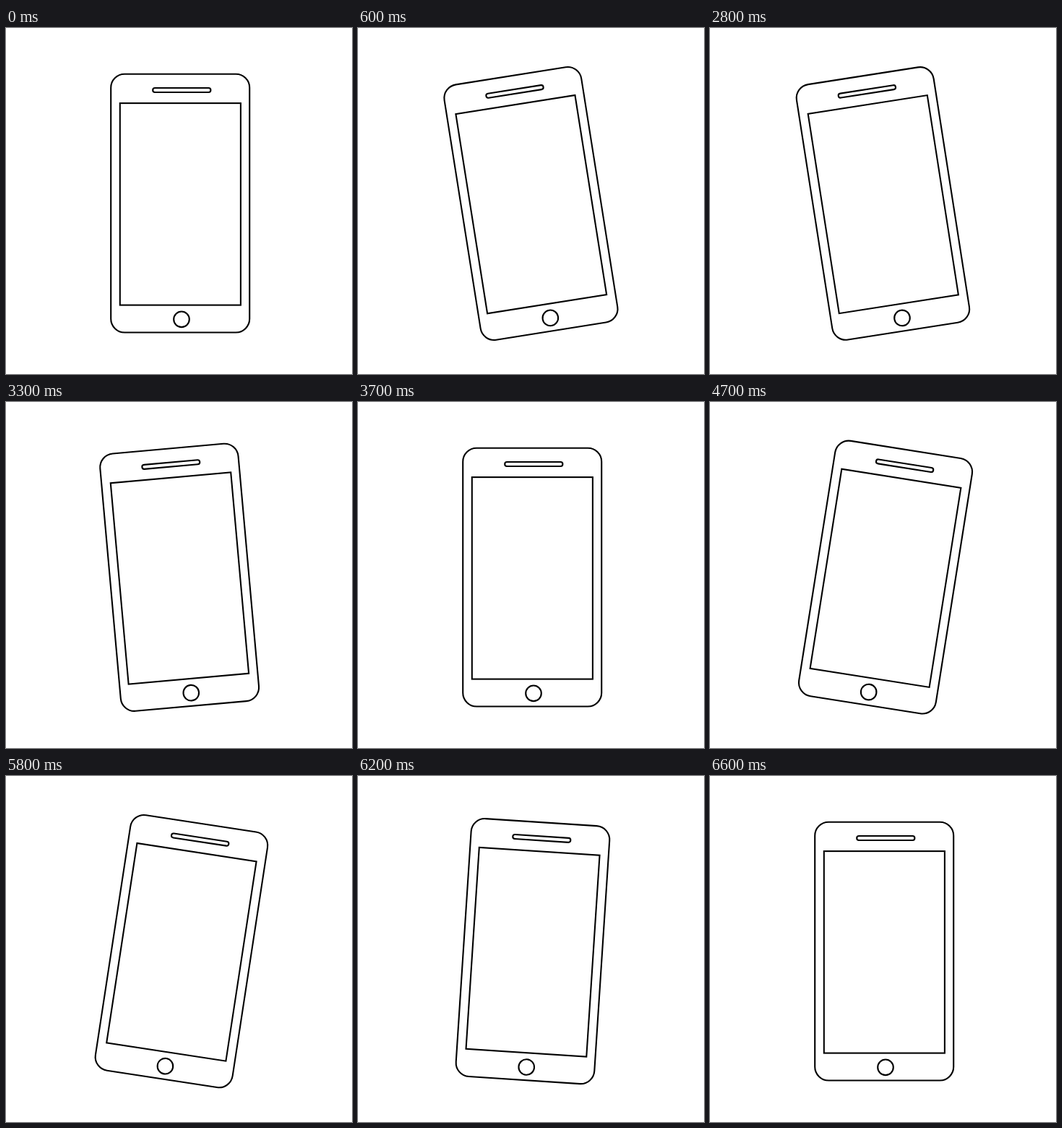
Write an HTML page that moves like this. It is 479 by 479 pixels and loops after 6700 ms.

```html
<!DOCTYPE html>
<html lang="en">
<head>
<meta charset="utf-8">
<title>Tilting phone</title>
<style>
  html, body { margin: 0; width: 100%; height: 100%; overflow: hidden; background: #fff; }
  svg { display: block; width: 100%; height: 100%; }
</style>
</head>
<body>
<svg viewBox="0 0 479 479">
  <g id="phone" fill="none" stroke="#000" stroke-width="2.1">
    <rect x="145.2" y="63.8" width="192" height="357.7" rx="19"/>
    <rect x="157.8" y="104.1" width="167.1" height="279.5"/>
    <rect x="203.2" y="83" width="80.2" height="6" rx="3"/>
    <circle cx="243" cy="403.3" r="10.8"/>
  </g>
</svg>
<script>
  const LOOP = 6700, STEP = 100, TILT = 9;
  const PIVOT = "242.4 254.1";
  // Each swing: start ms, end ms, start angle, end angle
  const swings = [
    [0, 600, 0, -TILT],
    [2700, 4700, -TILT, TILT],
    [5700, 6600, TILT, 0],
  ];
  const phone = document.getElementById("phone");
  const ease = p => p * p * (3 - 2 * p);

  function angleAt(time) {
    const [start, end, from, to] = swings.findLast(swing => time >= swing[0]);
    const progress = Math.min(1, (time - start) / (end - start));
    return from + (to - from) * ease(progress);
  }

  function draw() {
    const time = Math.floor(performance.now() % LOOP / STEP) * STEP;
    phone.setAttribute("transform", `rotate(${angleAt(time)} ${PIVOT})`);
    requestAnimationFrame(draw);
  }
  draw();
</script>
</body>
</html>
```
